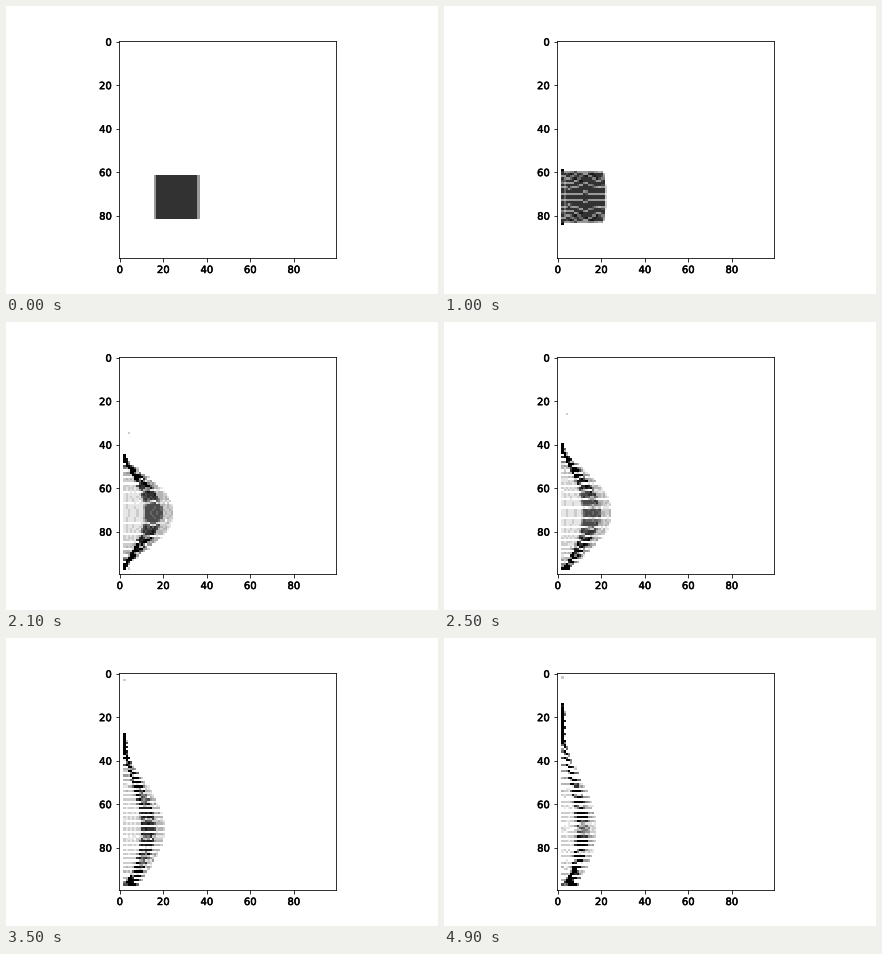
These frames come from a looping animation (432 by 288 pixels, 5000 ms). A matplotlib script:

```python
import numpy as np
import matplotlib.pyplot as plt
from matplotlib import patheffects
from matplotlib.animation import FuncAnimation

FRAMES, INTERVAL = 50, 100
N, SIZE = 100, 20
WALL, FLOOR, MID = 2.0, 97.9, 72.0
START, SPEED, IMPACT = 16.5, 1.5, 10
ROWS, COLS = 40, 80
FULL = 0.8  # density of the undisturbed block

# Key times and values of the splash: half height, width, taper, clustering.
HEIGHT = ([10, 12, 17, 25, 30, 40, 49], [11.8, 14.8, 21, 31, 37, 48.3, 56.8])
WIDTH = ([10, 13, 17, 25, 30, 36, 40, 49], [20.3, 22.3, 23, 23.2, 21, 18.4, 17, 16])
TAPER = ([10, 13, 17, 25, 30, 40, 49], [0.03, 0.5, 1.3, 1.6, 1.9, 2.7, 3.3])
CLUSTER = ([10, 16], [0.05, 1])

u, v = np.meshgrid((np.arange(COLS) + 0.5) / COLS,
                   (np.arange(ROWS) + 0.5) / ROWS * 2 - 1)
jitter = np.random.default_rng(4).normal(0, 0.12, u.shape)


def key(track, t):
    return np.interp(t, *track)


def splash(t):
    """Particle positions after the block has hit the left wall."""
    half, width, taper = key(HEIGHT, t), key(WIDTH, t), key(TAPER, t)
    age = min(1, (t - IMPACT) / 20)
    spread = 0.4 * age
    g = v * (1 + spread * np.abs(v)) / (1 + spread)
    y = half * g * (1 + 0.1 * (0.5 - u) * np.abs(v))
    y += 0.4 * np.sin(9 * u) * v + jitter * age

    # Thin near the wall, dense in the arch, thin again at the outer fringe.
    packed = np.interp(u, [0, 0.15, 0.85, 1], [0, 0.42, 0.78, 1])
    mix = key(CLUSTER, t)
    s = (1 - mix) * u + mix * packed
    profile = np.clip(1 - (y / half) ** 2, 0, 1) ** taper
    x = WALL + np.maximum(width * profile, 1.2) * s

    excess = np.maximum(0, MID + y - FLOOR)
    return x + 0.2 * excess, np.minimum(MID + y, FLOOR) - 0.25 * excess


def density(t):
    if t < IMPACT:
        x, y = START - SPEED * t + SIZE * u, MID + SIZE / 2 * v
    else:
        x, y = splash(t)
    grid, _, _ = np.histogram2d(y.ravel(), x.ravel(), bins=N,
                                range=[[0, N], [0, N]])
    grid *= FULL * SIZE * SIZE / (ROWS * COLS)

    # Stray droplets run ahead of both jets.
    if t > IMPACT:
        rise = 27.5 + 2.28 * (t - 17)
        col = 4 if t < 28 else 2
        for row in (max(2, MID - rise), min(97, MID + rise)):
            grid[int(row), col] += 0.2
    return np.minimum(grid, 1)


fig, ax = plt.subplots(figsize=(6, 4), dpi=72)
fig.subplots_adjust(left=0.125, right=0.9, bottom=0.125, top=0.88)
image = ax.imshow(density(0), cmap="gray_r", vmin=0, vmax=1,
                  interpolation="nearest")
ax.set_xticks(range(0, N, 20))
ax.set_yticks(range(0, N, 20))
for label in ax.get_xticklabels() + ax.get_yticklabels():
    label.set_fontfamily("DejaVu Sans")
    label.set_fontsize(10)
    label.set_path_effects([patheffects.withStroke(linewidth=0.5, foreground="black")])


def update(t):
    image.set_data(density(t))
    return [image]


anim = FuncAnimation(fig, update, frames=FRAMES, interval=INTERVAL,
                     repeat=True, repeat_delay=0)
plt.show()
```
